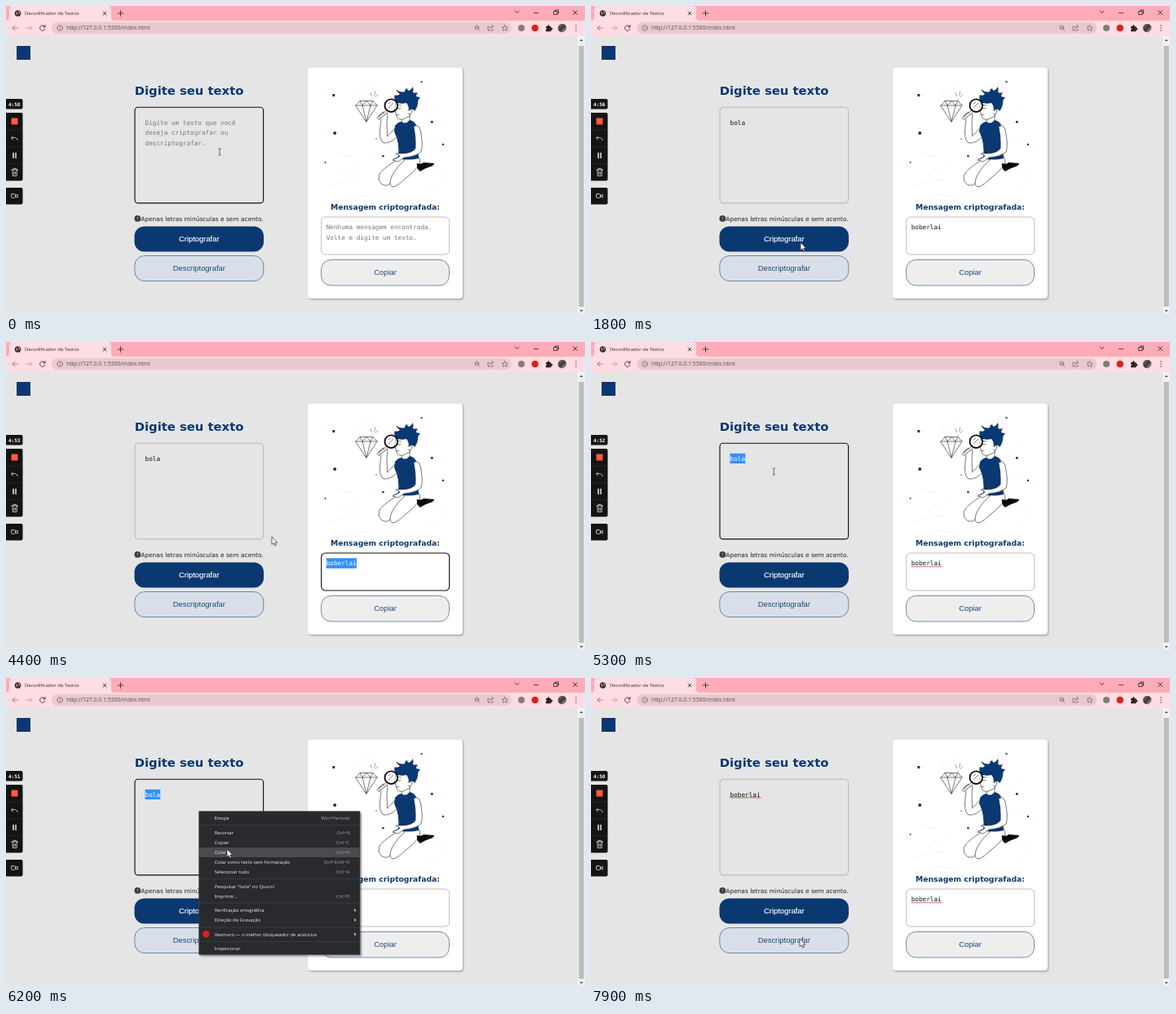
These frames come from a looping animation (710x378 px, 8 s). An HTML page:

```html
<!DOCTYPE html>
<html lang="pt-BR">
<head>
<meta charset="utf-8">
<title>Decodificador de Textos</title>
<style>
  html, body { margin: 0; width: 100%; height: 100%; overflow: hidden; background: #e5e5e5; }
  svg { display: block; width: 710px; height: 378px; }
  text { white-space: pre; }
  .ui { font-family: "Open Sans", sans-serif; }
  .head { font-family: "DejaVu Sans", sans-serif; font-weight: bold; fill: #0a3871; }
  .note { font: 7.46px "DejaVu Sans", sans-serif; fill: #222; }
  .mono { font: 7.7px "DejaVu Sans Mono", monospace; }
  .hint { fill: #777; }
  .btn { font: 9.4px "Liberation Sans", sans-serif; fill: #1c467b; text-anchor: middle; }
  .edge { stroke: #2f5583; stroke-width: .65; }
  .clock { font: bold 6px "DejaVu Sans Mono", monospace; fill: #fff; }
  .line, .white { fill: none; stroke-linecap: round; stroke-linejoin: round; }
  .line { stroke: #3d3237; stroke-width: .9; }
  .thin { stroke: #6d5c62; stroke-width: .7; }
  .white { stroke: #e8e8e8; stroke-width: .8; }
  .ink { fill: #fff; stroke: #2c2c2c; stroke-width: .65; stroke-linecap: round; stroke-linejoin: round; }
  .field { fill: none; stroke: #a2a2a2; stroke-width: .7; }
  .field.focus { stroke: #111; stroke-width: 1.15; }
  .wave { fill: none; stroke: #c0282a; stroke-width: .8; }
  .sel { fill: #338fff; }
  #menu text { font-size: 5.85px; fill: #f1f1f1; }
  #menu .key { fill: #a5a7aa; text-anchor: end; }
</style>
</head>
<body>
<svg viewBox="0 0 710 378">
  <defs>
    <linearGradient id="photo" x2="1" y2="1">
      <stop offset="0" stop-color="#8d8785"/><stop offset=".5" stop-color="#3a3435"/><stop offset="1" stop-color="#c9c0bf"/>
    </linearGradient>
    <filter id="soft" x="-10%" y="-10%" width="120%" height="120%"><feGaussianBlur stdDeviation="1"/></filter>
  </defs>

  <!-- browser window -->
  <rect width="710" height="37" fill="#ffabb8"/>
  <path d="M0 18Q4 18 4 14V4Q4 0 8 0H125Q129 0 129 4V14Q129 18 133 18H710V37H0Z" fill="#ffdde2"/>
  <circle cx="14.500" cy="9" r="3.800" fill="#33292d"/>
  <path d="M11.800 7.500L14 8.500 13 10.800M15 5.800L17 8 15.500 10" fill="none" stroke="#ffdde2" stroke-width=".8"/>
  <text class="ui" x="23" y="11.200" font-size="5.980" fill="#33292d">Decodificador de Textos</text>
  <path class="line" d="M119 7l4 4m0-4l-4 4M140.500 5.700v6.600m-3.300-3.300h6.600"/>
  <path class="line" d="M624 6l2.500 2.500L629 6M647.500 8.500h5M695.500 5.500l5 5m0-5l-5 5M672 6.500h4v4h-4zM673.500 6.500v-1.500h4v4H676"/>
  <path class="line thin" d="M14.500 27H8m3-3l-3 3 3 3"/>
  <path class="line thin" d="M25 27h6.500m-3-3l3 3-3 3" stroke-opacity=".6"/>
  <path class="line" d="M47.400 25A3.300 3.300 0 1 0 48 28M48 23.300V25.800H45.500"/>
  <rect x="56" y="20" width="564" height="14" rx="7" fill="#e8c9ce"/>
  <g class="line thin">
    <circle cx="66" cy="27" r="3.300"/><path d="M66 26.500v2M66 25v.1"/>
    <circle cx="577.300" cy="26.300" r="2.400"/><path d="M579.200 28.200l1.800 1.800M576.200 26.300h2.200"/>
    <path d="M592.500 25H591v5h6v-1.500M593 28q.5-3 4-3m-1.500-2l2 2-2 2"/>
    <path d="M611.500 23.500l1.100 2.400 2.600.2-2 1.700.7 2.600-2.400-1.400-2.400 1.400.7-2.600-2-1.700 2.600-.2z"/>
  </g>
  <text class="ui" x="74" y="29.400" font-size="6.840" fill="#5b4b50">http://127.0.0.1:5500/index.html</text>
  <circle cx="632" cy="27" r="4" fill="#7f7d80"/>
  <circle cx="648.700" cy="27" r="4.300" fill="#e0201b"/>
  <path d="M662 25h2a1.300 1.300 0 1 1 2.400 0h2v2a1.300 1.300 0 1 1 0 2.400v1.800h-6.400v-2a1.300 1.300 0 0 0 0-2.400z" fill="#2c2327"/>
  <circle cx="682" cy="27" r="5.300" fill="url(#photo)"/>
  <path d="M699 24v.1m0 2.900v.1m0 2.900v.1" class="line" style="stroke-width:1.400"/>
  <rect x="701" y="37" width="9" height="341" fill="#f1f1f1"/>
  <rect x="702.300" y="49" width="6.400" height="320" fill="#bcbcbc"/>
  <path d="M703.500 43l2-2.500 2 2.500zM703.500 373l2 2.500 2-2.500z" fill="#555"/>

  <!-- page, left column -->
  <rect x="13" y="49" width="17" height="17" fill="#0a3871"/>
  <text class="head" x="157.700" y="109" font-size="14.800">Digite seu texto</text>
  <rect id="inBox" class="field" x="158" y="124.200" width="157.600" height="117.700" rx="4"/>
  <g id="inHint" class="mono hint">
    <text x="170.500" y="145.500">Digite um texto que você</text>
    <text x="170.500" y="158.300">deseja criptografar ou</text>
    <text x="170.500" y="171.100">descriptografar.</text>
  </g>
  <rect id="inSel" class="sel" x="170.500" y="136.800" width="18.700" height="12.200"/>
  <text id="inText" class="mono" x="170.500" y="145.500"></text>
  <path id="inWave" class="wave"/>
  <path id="caret" stroke="#222" stroke-width=".7"/>
  <circle cx="161.300" cy="260.800" r="3.900" fill="#3a3a3a"/>
  <path d="M161.300 258.700v2.500m0 1.300v.5" stroke="#d5d5d5" stroke-width=".8"/>
  <text class="note" x="165.200" y="264">Apenas letras minúsculas e sem acento.</text>
  <rect x="157.500" y="270.500" width="158.500" height="31" rx="12" fill="#0a3871"/>
  <text class="btn" x="236.800" y="289.300" style="fill:#fff;stroke:#fff;stroke-width:.15">Criptografar</text>
  <rect class="edge" x="157.800" y="306.500" width="158" height="31" rx="12" fill="#d8dfe8"/>
  <text class="btn" x="236.800" y="325.300">Descriptografar</text>

  <!-- page, card -->
  <rect x="371" y="76.500" width="190" height="284" rx="4" fill="#777" opacity=".6" filter="url(#soft)"/>
  <rect x="370" y="75.500" width="190" height="283.500" rx="4" fill="#fff"/>
  <g id="art">
    <g fill="none" stroke="#e4e4e4" stroke-width=".6" stroke-dasharray="5 3 2 4">
      <path d="M428 104l20-5M413 208l25-14M394 221l42-9M512 136l13-10M520 222l20-9M405 181l22 4M514 161l15 5M422 231l25 3M528 205l9-6M490 99l9-5"/>
    </g>
    <g fill="#0a3871">
      <path d="M400.300 108h3v3h-3z"/>
      <circle cx="509.500" cy="93.200" r="1.100"/><circle cx="403.200" cy="156" r="2"/>
      <circle cx="522.300" cy="142.300" r="1.500"/><circle cx="391.500" cy="192" r="1"/>
      <circle cx="462.400" cy="184.200" r="1.300"/><circle cx="536" cy="170" r="1.200"/><circle cx="454" cy="163" r=".7"/>
    </g>
    <g class="ink">
      <path d="M429 122l5-5.500h16l5 5.500-13 20z"/>
      <path d="M429 122h26M434 116.500l3 5.500 5 20 5-20 3-5.500M437 122l5-5.500 5 5.500" fill="none"/>
      <path d="M447 106.500l2 4M452.500 105l-.5 5M456 109l-3 2.500" fill="none" stroke-opacity=".7"/>
      <!-- legs -->
      <path d="M482 187C470 195 460 201 457.500 208C456 216 461 221 468 220Q474 217 478 208L497 190Z"/>
      <path d="M506 185C509 190 508 194 505 197Q500 204 488 213C482 219 477 223 473 221.500Q469 219 473 209Q480 196 491 187Z"/>
      <!-- neck, raised arm, face -->
      <path d="M486 136l-1 9q5 4 10 0v-12z"/>
      <path d="M478 149C473 154 470 158 467.500 160L467 142 468 133 463 130 457 135 460 140C458 153 457 164 463 168Q472 169 480 160Z"/>
      <path d="M478 118C477 122 478 125 475.500 128.500L478 130Q477.500 133 479 135Q480 140 487 139L495 135 499 122 497 115Z"/>
      <path d="M480 125.500q2 1 4 0M479 133.500h2.500M480.500 121.500l4 .5" fill="none"/>
      <path d="M493 128q4.500-4 5 1.500-1.500 5-5 2.500"/>
    </g>
    <path d="M478 118Q475 112 477 109Q480 111 483 108Q479 105 478 102Q484 107 489 105Q489 102 492 101Q492 103 494 104Q497 103 499 99Q500 103 499 106Q502 107 505 106Q503 109 503 111Q506 112 508 112Q505 115 505 118Q505 124 501 129Q498 124 494 129Q494 122 491 119Q484 121 478 118Z" fill="#0a3871"/>
    <path d="M477 147Q481 142 485 142Q490 146 495 140Q502 141 504 149L506 187Q494 190 481 187Q483 167 476 154Z" fill="#0a3871"/>
    <g class="ink">
      <path d="M500 148Q506 144 508 152Q512 170 509 179Q502 185 488 186L481 191 474 189 483 184 478 181 486 181Q497 181 502 175Q503 162 500 148Z"/>
      <path d="M476 188l6-2.500M457 135l4 1M459 132.500l4 2M462 130.500l3 3" fill="none"/>
      <path d="M467 128l-12 9.500 1.800 2L468.500 130z"/>
    </g>
    <path d="M504 193Q509 195 512 192L525 193Q525 196 518 198Q512 200 508 203Q503 200 504 193Z" fill="#0b0b0b"/>
    <circle cx="472.300" cy="122.200" r="7.800" fill="#fff" fill-opacity=".5" stroke="#0b0b0b" stroke-width="1.800"/>
    <path d="M469 125l6-6M469 120l2.500-2.500" stroke="#555" stroke-width=".7"/>
  </g>
  <text class="head" x="398" y="250" font-size="9.220">Mensagem criptografada:</text>
  <rect id="outBox" class="field" x="386.700" y="259" width="157" height="46" rx="5" style="fill:#fff"/>
  <g id="outHint" class="mono hint">
    <text x="392.700" y="274.300">Nenhuma mensagem encontrada.</text>
    <text x="392.700" y="287">Volte e digite um texto.</text>
  </g>
  <rect id="outSel" class="sel" x="392.700" y="265.300" width="37.200" height="12.500"/>
  <text id="outText" class="mono" x="392.700" y="274.300"></text>
  <path id="outWave" class="wave"/>
  <rect class="edge" x="386.500" y="311.500" width="157" height="31.500" rx="12" fill="#eee"/>
  <text class="btn" x="465" y="330.300">Copiar</text>

  <!-- recorder bar -->
  <path d="M0 114H18.500Q20.500 114 20.500 116V124.500Q20.500 126.500 18.500 126.500H0ZM0 131H18.500Q20.500 131 20.500 133V212.500Q20.500 214.500 18.500 214.500H0ZM0 223H18.500Q20.500 223 20.500 225V241.500Q20.500 243.500 18.500 243.500H0Z" fill="#141414"/>
  <path d="M0 152h20.500M0 173h20.500M0 193.500h20.500" stroke="#303030" stroke-width=".6"/>
  <text id="clock" class="clock" x="3" y="122.500"></text>
  <rect x="6.500" y="137.500" width="8" height="8" rx="1" fill="#ff5b3d"/>
  <g class="white">
    <path d="M8.500 160l-2 2 2 2M6.800 162Q13 160 14.300 164.500"/>
    <path d="M9 180.500v6M12 180.500v6" style="stroke-width:1.500"/>
    <path d="M6.800 201h7.800M7.800 201l.5 7.500h4.800l.5-7.500M9.200 201v-1.700h3v1.700M9.800 203.500v3M11.600 203.500v3"/>
    <rect x="6.500" y="230.700" width="5" height="4.600" rx="1"/><path d="M11.500 233l2.700-1.800v3.600z"/>
  </g>

  <g id="menu" class="ui">
    <rect x="238" y="165.500" width="198" height="176" fill="#000" opacity=".4" filter="url(#soft)"/>
    <rect x="236.700" y="163.700" width="197.300" height="175.600" fill="#292a2d" stroke="#444" stroke-width=".6"/>
    <rect id="hover" x="237" width="196.700" height="12" fill="#4a4b4e"/>
    <circle cx="245.300" cy="314.300" r="4.300" fill="#e0201b"/>
  </g>
  <path id="arrow" d="M0 0V9.600L2.200 7.700 3.700 11 5.300 10.300 3.800 7.100H6.800Z" fill="#fff" stroke="#222" stroke-width=".7"/>
  <path id="beam" d="M-1.700-4.200Q0-4.200 0-3.200V3.200Q0 4.200-1.700 4.200M1.700-4.200Q0-4.200 0-3.200M0 3.200Q0 4.200 1.700 4.200" fill="none" stroke="#333" stroke-width=".7"/>
</svg>
<script>
const LOOP = 8000, CHAR = 4.635;
const $ = id => document.getElementById(id);
const show = (id, on) => $(id).setAttribute('visibility', on ? 'visible' : 'hidden');
const within = (t, a, b) => t >= a && t < b;
const latest = (t, steps) => steps.filter(s => s[0] <= t).pop()[1];

// y centre, label, shortcut ('>' opens a submenu)
const items = [
  [172, 'Emojis', 'Win+Período'],
  [190, 'Recortar', 'Ctrl+X'], [202, 'Copiar', 'Ctrl+C'], [214, 'Colar', 'Ctrl+V'],
  [226, 'Colar como texto sem formatação', 'Ctrl+Shift+V'], [238, 'Selecionar tudo', 'Ctrl+A'],
  [255.5, 'Pesquisar "bola" no Quorvi', ''], [267.5, 'Imprimir...', 'Ctrl+P'],
  [285, 'Verificação ortográfica', '>'], [297, 'Direção de Gravação', '>'],
  [314.5, 'Vexmuro — o melhor bloqueador de anúncios', '>'],
  [332, 'Inspecionar', '']
];
const rules = [180.5, 246.5, 276, 306, 323.5];

function add(tag, attrs, content = '') {
  const el = document.createElementNS('http://www.w3.org/2000/svg', tag);
  for (const k in attrs) el.setAttribute(k, attrs[k]);
  el.textContent = content;
  $('menu').append(el);
}
for (const y of rules) add('path', { d: `M237 ${y}H433.7`, stroke: '#47484b', 'stroke-width': .6 });
for (const [y, label, key] of items) {
  add('text', { x: 255.7, y: y + 2.1 }, label);
  if (key === '>') add('path', { d: `M427.3 ${y - 2}l2.200 2-2.200 2z`, fill: '#ddd' });
  else add('text', { class: 'key', x: 421.5, y: y + 2.1 }, key);
}

function wave(x, y, width) {
  let d = `M${x} ${y}`;
  for (let i = 0; i < width / 2; i++) d += 'q.5-.8 1 0t1 0';
  return d;
}
$('inWave').setAttribute('d', wave(170.5, 146.9, 37));
$('outWave').setAttribute('d', wave(392.7, 275.7, 37));

const path = [
  [0, 262, 179], [950, 262, 179], [1500, 243, 288], [1750, 243, 288], [2500, 452, 320],
  [2850, 452, 320], [3300, 413, 271], [4000, 413, 271], [4200, 377, 259], [4400, 326, 239],
  [4600, 243, 183], [4800, 186, 144], [5150, 186, 144], [5350, 237, 164], [5550, 237, 164],
  [6100, 271, 210], [6400, 271, 210], [6401, 273, 210], [6800, 273, 210], [7300, 260, 296],
  [7700, 256, 320], [LOOP, 256, 320]
];
function pointer(t) {
  const i = path.findIndex(p => p[0] > t);
  const [t0, x0, y0] = path[i - 1], [t1, x1, y1] = path[i];
  const k = (t - t0) / (t1 - t0);
  return [x0 + (x1 - x0) * k, y0 + (y1 - y0) * k];
}

const typed = [[0, ''], [400, 'b'], [500, 'bo'], [600, 'bol'], [800, 'bola'], [6300, 'boberlai']];
const overField = (x, y) =>
  (x > 158 && x < 316 && y > 124 && y < 242) || (x > 386 && x < 544 && y > 258 && y < 305);

function draw(t) {
  const [x, y] = pointer(t);
  const input = latest(t, typed);
  const done = t >= 1700;
  const inSel = within(t, 4900, 6300), outSel = within(t, 3600, 4900);
  const menu = within(t, 5450, 6300);

  $('clock').textContent = '4:' + (58 - Math.floor((t + 800) / 1000));
  $('inText').textContent = input;
  $('outText').textContent = done ? 'boberlai' : '';
  $('inText').setAttribute('fill', inSel ? '#fff' : '#111');
  $('outText').setAttribute('fill', outSel ? '#fff' : '#111');
  show('inHint', !input);
  show('outHint', !done);
  show('inSel', inSel);
  show('outSel', outSel);
  show('inWave', t >= 7700);
  show('outWave', t >= 4900);
  $('inBox').classList.toggle('focus', !done || within(t, 4900, 7900));
  $('outBox').classList.toggle('focus', outSel);

  const cx = 170.7 + input.length * CHAR;
  $('caret').setAttribute('d', `M${cx} 138v9.500`);
  show('caret', within(t, 100, 1300) || within(t, 6300, 6900) || within(t, 7400, 7900));

  const row = t > 5600 && items.find(([c]) => Math.abs(c - y) <= 6);
  $('menu').style.display = menu ? '' : 'none';
  $('hover').setAttribute('y', row ? row[0] - 6 : 0);
  $('hover').style.display = row ? '' : 'none';

  const beam = overField(x, y) && !within(t, 5450, 6401);
  for (const id of ['arrow', 'beam']) $(id).setAttribute('transform', `translate(${x} ${y})`);
  show('beam', beam);
  show('arrow', !beam);
}

let start;
function tick(now) {
  start ??= now;
  draw((now - start) % LOOP);
  requestAnimationFrame(tick);
}
draw(0);
requestAnimationFrame(tick);
</script>
</body>
</html>
```
